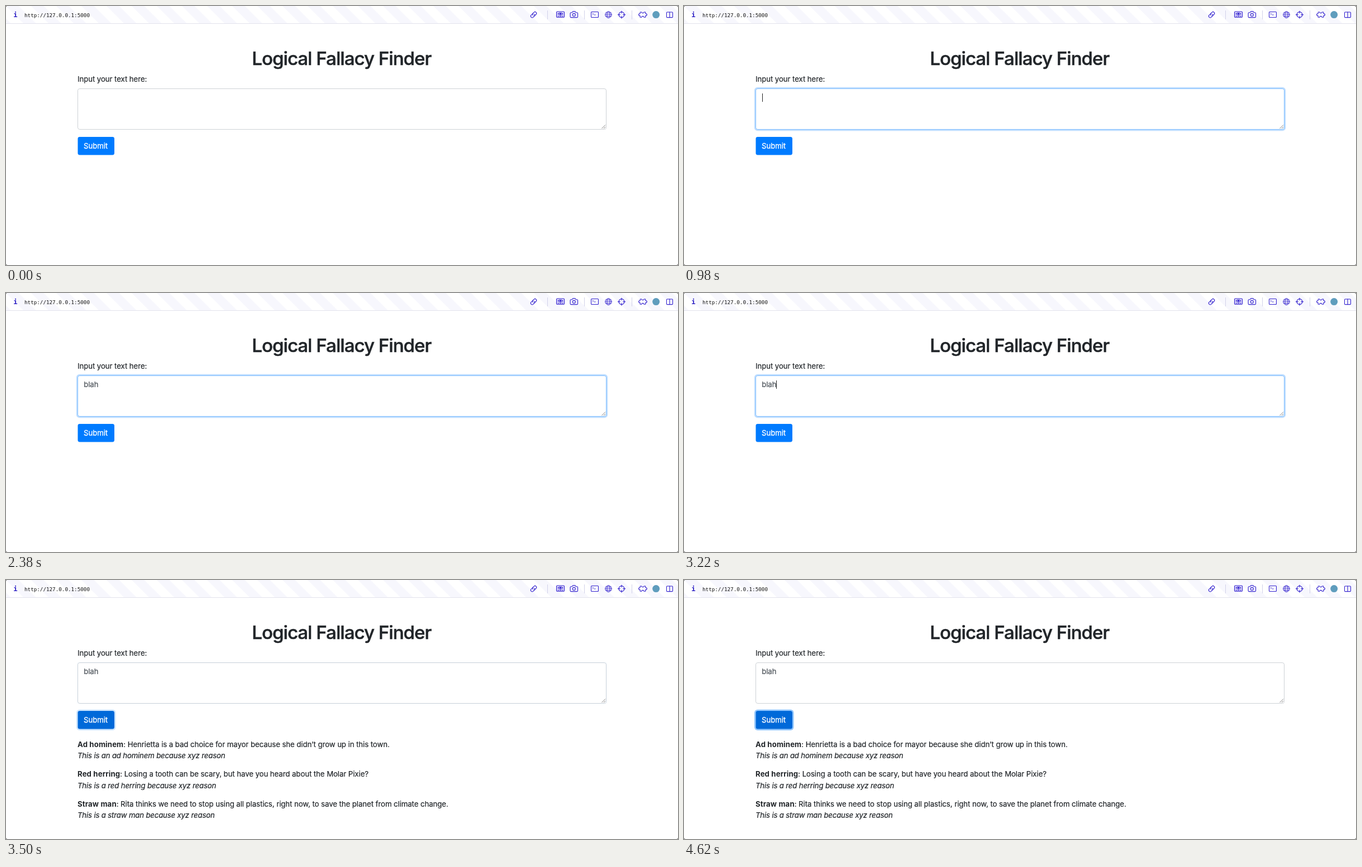
These frames come from a looping animation (1203x465 px, 4760 ms). An HTML page:

```html
<!DOCTYPE html>
<html lang="en">
<head>
<meta charset="utf-8">
<title>Logical Fallacy Finder</title>
<style>
html, body { margin: 0; width: 100%; height: 100%; overflow: hidden; background: #666; }
svg { display: block; }
text {
  font: 13.2px Inter, Roboto, sans-serif;
  font-optical-sizing: none;
  letter-spacing: -0.06px;
  fill: #212529;
  stroke: #212529;
  stroke-width: 0.2;
}
.title { font-size: 33px; font-weight: 500; letter-spacing: -0.95px; text-anchor: middle; stroke-width: 0.5; }
.url { font: 9.25px "DejaVu Sans Mono", monospace; letter-spacing: 0; fill: #111; stroke: none; }
.info { font: bold 12px "DejaVu Sans Mono", monospace; fill: #2c1fc4; stroke: none; }
.bold { font-weight: 700; letter-spacing: 0.13px; stroke: none; }
.italic { font-style: italic; letter-spacing: -0.16px; }
.typed { fill: #495057; stroke: #495057; }
.submit { fill: #fff; stroke: #fff; stroke-width: 0.3; }
.icons { fill: none; stroke: #3524cf; stroke-width: 1.1; stroke-linecap: round; stroke-linejoin: round; }
</style>
</head>
<body>
<svg width="1203" height="465" viewBox="0 0 1203 465">
  <defs>
    <pattern id="stripes" width="45" height="40" patternUnits="userSpaceOnUse" patternTransform="skewX(45)">
      <rect width="22.5" height="40" fill="#f7f7fd"/>
    </pattern>
  </defs>
  <rect width="1203" height="465" rx="3" fill="#fff"/>
  <rect width="1203" height="31" rx="3" fill="url(#stripes)"/>
  <path d="M0 31.5H1203" stroke="#e2e2ec"/>

  <text class="info" x="13.3" y="20">i</text>
  <text class="url" x="33" y="19.5">http://127.0.0.1:5000</text>

  <path d="M969.5 8V24M1035.5 8V24M1120.5 8V24" stroke="#d2d2ea"/>
  <g class="icons">
    <g transform="translate(944.5 15.7) rotate(-45)">
      <path d="M1.5 -2.6H-3.6a2.6 2.6 0 0 0 0 5.2H-1a2.6 2.6 0 0 0 2.4 -2.6"/>
      <path d="M-1.5 2.6H3.6a2.6 2.6 0 0 0 0 -5.2H1a2.6 2.6 0 0 0 -2.4 2.6"/>
    </g>
    <rect x="985.5" y="10" width="14" height="10.5" rx="1.6" fill="#dcd9fa"/>
    <path d="M988 14.2q4.5 -4 9 0q-4.5 4 -9 0M988 18.4h1.5M991.3 18.4h2.5M995.6 18.4h1.5"/>
    <circle cx="992.5" cy="14.2" r=".9" fill="#3524cf"/>
    <path d="M1011.5 11.8h2l1.2 -1.9h4.2l1.2 1.9h2a1.4 1.4 0 0 1 1.4 1.4v6a1.4 1.4 0 0 1 -1.4 1.4h-10.6a1.4 1.4 0 0 1 -1.4 -1.4v-6a1.4 1.4 0 0 1 1.4 -1.4z"/>
    <circle cx="1016.8" cy="15.9" r="2.5"/>
    <rect x="1047.5" y="10.5" width="13" height="10" rx="1.3"/>
    <path d="M1050 13l1.6 1.4l-1.6 1.4M1053 15.9h2.2" stroke-width=".9"/>
    <g stroke-width=".9">
      <circle cx="1078.5" cy="15.6" r="5.7"/>
      <ellipse cx="1078.5" cy="15.6" rx="2.6" ry="5.7"/>
      <path d="M1072.8 15.6h11.4M1073.7 12.7h9.6M1073.7 18.5h9.6"/>
    </g>
    <circle cx="1102" cy="15.6" r="5"/>
    <path d="M1102 9v3.8M1102 18.4v3.8M1095.4 15.6h3.8M1104.8 15.6h3.8"/>
    <path d="M1135.2 11h2.8a2 1.8 0 0 0 4 0h2.8v2.6a2.6 2 0 0 1 0 4v2.6h-2.8a2 1.8 0 0 0 -4 0h-2.8v-2.6a2.6 2 0 0 1 0 -4z"/>
    <rect x="1182.5" y="11" width="11" height="9.6" rx="1.2"/>
    <path d="M1188 11v9.6"/>
  </g>
  <circle cx="1163.7" cy="15.6" r="6.5" fill="#5f9dbd"/>

  <text class="title" x="600.8" y="106.4">Logical Fallacy Finder</text>
  <text x="128" y="136">Input your text here:</text>

  <rect id="boxGlow" x="125.8" y="145.8" width="951.4" height="78.4" rx="6" fill="#007bff"/>
  <rect id="box" x="128.5" y="148.5" width="946" height="73" rx="3.4" fill="#fff"/>
  <path d="M1066.5 220L1073 213.5M1070 220L1073 217" stroke="#777" stroke-width=".9"/>
  <text id="typed" class="typed" x="139.2" y="169"></text>
  <rect id="caret" y="157" width="1" height="15" fill="#222"/>

  <rect id="btnGlow" x="125.9" y="232.4" width="70.7" height="37.6" rx="6" fill="#268fff"/>
  <rect x="128.5" y="235" width="65.5" height="32.4" rx="3.4" fill="#fff"/>
  <rect id="btn" x="128.5" y="235" width="65.5" height="32.4" rx="3.4"/>
  <text class="submit" x="139" y="256">Submit</text>

  <g id="results"></g>
</svg>
<script>
const LOOP = 4760, STEP = 70;
const $ = id => document.getElementById(id);

const findings = [
  ["Ad hominem", "Henrietta is a bad choice for mayor because she didn’t grow up in this town.", "an ad hominem"],
  ["Red herring", "Losing a tooth can be scary, but have you heard about the Molar Pixie?", "a red herring"],
  ["Straw man", "Rita thinks we need to stop using all plastics, right now, to save the planet from climate change.", "a straw man"]
];
$("results").innerHTML = findings.map(([name, quote, kind], i) => {
  const y = 299.8 + i * 53.6;
  return `<text x="128" y="${y}"><tspan class="bold">${name}</tspan>: ${quote}</text>` +
    `<text class="italic" x="128" y="${y + 20.3}">This is ${kind} because xyz reason</text>`;
}).join("");

const keyTimes = [1400, 1540, 1680, 1820];

function ramp(t, from, to) {
  const p = Math.min(1, Math.max(0, (t - from) / (to - from)));
  return p * p * (3 - 2 * p);
}

function mix(a, b, p) {
  return `rgb(${a.map((v, i) => Math.round(v + (b[i] - v) * p))})`;
}

function draw(t) {
  const focus = ramp(t, 840, 980) * (1 - ramp(t, 3390, 3520));
  $("box").setAttribute("stroke", mix([206, 210, 214], [128, 189, 255], focus));
  $("boxGlow").setAttribute("opacity", 0.25 * focus);

  const typed = $("typed");
  typed.textContent = "blah".slice(0, keyTimes.filter(k => t >= k).length);
  const end = typed.textContent ? 139.2 + typed.getComputedTextLength() : 140;
  $("caret").setAttribute("x", Math.floor(end));
  const caretOn = t >= 840 && t < 3430 && !(t >= 2380 && t < 2870);
  $("caret").setAttribute("opacity", caretOn ? 1 : 0);

  $("btn").setAttribute("fill", mix([0, 123, 255], [0, 105, 217], ramp(t, 3290, 3430)));
  $("btnGlow").setAttribute("opacity", 0.5 * ramp(t, 3430, 3575));
  $("results").setAttribute("opacity", t >= 3500 ? 1 : 0);
}

const start = performance.now();
function tick() {
  const t = (performance.now() - start) % LOOP;
  draw(Math.floor(t / STEP) * STEP);
  requestAnimationFrame(tick);
}
tick();
</script>
</body>
</html>
```
